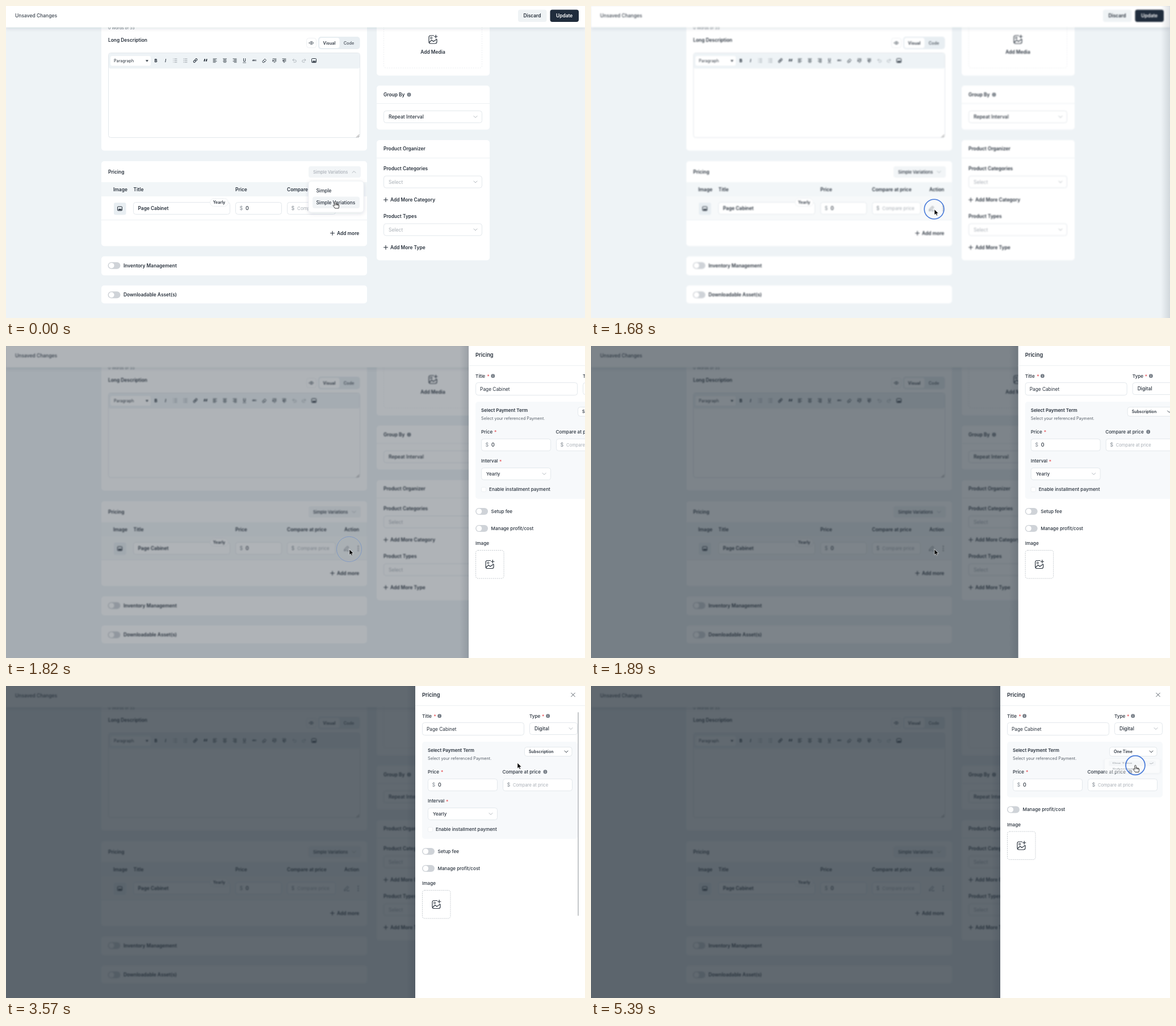
Animation, 1020 px wide and 549 px high, one loop 5.46 s. Source, as an HTML page:

```html
<!DOCTYPE html>
<html lang="en">
<head>
<meta charset="utf-8">
<title>Pricing editor</title>
<style>
html, body { margin: 0; width: 100%; height: 100%; overflow: hidden; background: #eef3f6; }
svg { display: block; width: 100%; height: 100%; font-family: Inter, "Open Sans", sans-serif; }
text { white-space: pre; }
</style>
</head>
<body>
<svg id="stage" viewBox="0 0 1020 549"></svg>
<script>
const INK = '#28313c', GREY = '#a9afb6', LINE = '#e3e8ec', TINT = '#eef3f6', ITEM = 'Page Cabinet';

// Drawing helpers: each returns SVG markup.
const text = (x, mid, s, size = 8.4, weight = 600, fill = INK, anchor = 'start') =>
  `<text x="${x}" y="${mid + size * .36}" font-size="${size}" font-weight="${weight}" fill="${fill}" text-anchor="${anchor}">${s}</text>`;
const rect = (x, y, w, h, r = 0, fill = '#fff', stroke = 'none', extra = '') =>
  `<rect x="${x}" y="${y}" width="${w}" height="${h}" rx="${r}" fill="${fill}" stroke="${stroke}" ${extra}/>`;
const path = (d, stroke = INK, w = 1, fill = 'none', extra = '') =>
  `<path d="${d}" stroke="${stroke}" stroke-width="${w}" fill="${fill}" stroke-linecap="round" stroke-linejoin="round" ${extra}/>`;
const group = (body, attrs = '') => `<g ${attrs}>${body}</g>`;
const at = (x, y, body, k = 1) => group(body, `transform="translate(${x} ${y}) scale(${k})"`);

const box = (x, y, w, h) => rect(x + .5, y + .5, w - 1, h - 1, 4, '#fff', LINE);
const card = (x, y, w, h) => rect(x, y, w, h, 5);
const rule = (x, y, w) => rect(x, y, w, 1, 0, '#edf1f3');
const chevron = (x, y, color = GREY, dir = 1) => path(`M${x - 3} ${y - 1.5 * dir}l3 ${3 * dir} 3 ${-3 * dir}`, color, .9);
const select = (x, y, w, label, color = INK, size = 8.6) =>
  box(x, y, w, 22) + text(x + 9, y + 11, label, size, color === INK ? 500 : 400, color) + chevron(x + w - 12, y + 11);
const money = (x, y, w, value, hint, size) => box(x, y, w, 22) + text(x + 7.5, y + 11, '$', 9, 400, '#868e96') +
  (value ? text(x + 18, y + 11, value, 9, 500) : text(x + 18, y + 11, hint, size, 400, GREY));
const plus = (x, y, label) => path(`M${x} ${y}h7m-3.5-3.5v7`, INK, 1.1) + text(x + 11.5, y, label);
const toggle = (x, y) => rect(x, y - 6, 22, 12, 6, '#cfd3d8') + `<circle cx="${x + 6.3}" cy="${y}" r="4.8" fill="#fff"/>`;
const info = (x, y) => `<circle cx="${x}" cy="${y}" r="3.4" fill="#737b84"/>` + path(`M${x} ${y - .2}v1.7m0-3.3v.1`, '#fff', .8);
const star = (x, y) => text(x, y + 1, '*', 8.4, 500, '#e5484d');
const media = (x, y, color = INK) => at(x, y,
  path('M1.5-7H-4Q-7-7-7-4V4Q-7 7-4 7H4Q7 7 7 4V-.5M-6.5 5L-2 1 1 3.5 6.5-.5M5.2-8v5.4M2.5-5.3h5.4', color, 1.15) +
  `<circle cx="-2.8" cy="-2.8" r="1.5" fill="none" stroke="${color}"/>`);
const picture = (x, y, color = INK) => at(x, y, rect(-4, -3.5, 8, 7, 1, 'none', color) +
  path('M-3 2.6L-1 0 .5 1.3 2 0 3.2 2.6z', color, .4, color));

function toolbar() {
  const bars = (x, xs) => xs.map(([a, b], i) => path(`M${x + a} ${93 + i * 2}H${x + b}`, INK, .9)).join('');
  const list = (x, dot) => [93, 96, 99].map(y => path(`M${x - 1} ${y}h4M${x - 3.2} ${y}h${dot}`, '#858c94', .8)).join('');
  const turn = (x, k) => group(path('M-1-3L-3-1 -1 1M-3-1H1Q3.4-1 3.4 1T1 3H-1', GREY, .9), `transform="translate(${x} 96) scale(${k} 1)"`);
  const shift = (x, k) => bars(x, [[-3, 3], [0, 3], [0, 3], [-1, 1]]) + path(`M${x - 2 - k} 95l${2 * k} 1.3 ${-2 * k} 1.3z`, INK, .5, INK);
  return text(264, 96, 'B', 7.6, 800, INK, 'middle') +
    `<g font-style="italic">${text(281, 96, 'I', 7.6, 600, INK, 'middle')}</g>` +
    list(298, .1) + list(316, .6) +
    group(rect(-4, -1.5, 4.2, 3, 1.5, 'none', INK) + rect(-.2, -1.5, 4.2, 3, 1.5, 'none', INK), 'transform="translate(333.5 96) rotate(-45)"') +
    text(351, 99, '“', 14, 800, INK, 'middle') +
    bars(368, [[-3, 3], [-3, 1], [-3, 3], [-3, 1]]) + bars(385.5, [[-3, 3], [-2, 2], [-3, 3], [-2, 2]]) +
    bars(403, [[-3, 3], [-1, 3], [-3, 3], [-1, 3]]) +
    text(420, 95.5, 'U', 7, 600, INK, 'middle') + path('M417.5 99.8h5', INK, .7) +
    text(437.5, 96, 'ABC', 3.4, 600, INK, 'middle') + path('M434 96h7', INK, .5) +
    path('M452 97l4-4 2.5 2.5-4 4h-1.5zM453.5 95.7l2.5 2.6', INK, .9) +
    shift(473, 1) + shift(490, -1) + turn(508, 1) + turn(525, -1) + picture(542.5, 96);
}

function menu(id, x, y, items, hover, size) {
  return group(rect(x, y, 97, 55, 5, '#fff', '#eceff2', 'filter="url(#soft)"') +
    rect(x + 7, y + 7 + hover * 20.5, 83, 20.5, 4, '#f1f4f6') +
    items.map((s, i) => text(x + 13.5, y + 17.3 + i * 20.5, s, size, 500)).join(''), `id="${id}"`);
}

const page = () => rect(0, 0, 1020, 549, 0, TINT) +
  // long description
  card(168, 20, 468, 234.5) + text(180, 38, '0 Words of 55', 7, 400, '#6d757d') + text(180, 60, 'Long Description') +
  rect(529.5, 56.5, 17, 17, 4, '#fff', '#eef1f3') + path('M534 65Q538 59.8 542 65Q538 70.2 534 65z', '#59616a', .9) +
  '<circle cx="538" cy="65" r="1.3" fill="none" stroke="#59616a" stroke-width=".9"/>' +
  rect(550, 54, 73.5, 22, 5, '#e8eef2') + rect(552, 56, 35.5, 18, 4) + text(569.5, 65, 'Visual', 7.3, 600, INK, 'middle') +
  text(604, 65, 'Code', 7.3, 600, '#59616a', 'middle') +
  rect(180.5, 82.5, 443, 149, 4, '#fff', LINE) + rect(181, 83, 442, 27, 3, TINT) +
  rect(184, 88, 71, 17, 3) + text(190, 96.3, 'Paragraph', 7.2, 400) + path('M246.5 95.3h4l-2 2.6z', INK, .4, INK) + toolbar() +
  path('M617.5 231l4.5-4.5M620 231l2-2', '#555', .7) +
  // side cards
  card(653, 20, 199, 102.5) + rect(665.5, 20, 173, 89, 4, 'none', '#eceff1', 'stroke-dasharray="2 2"') +
  media(752, 59) + text(752, 81, 'Add Media', 8.4, 600, INK, 'middle') +
  card(653, 140, 199, 77.5) + text(665, 156, 'Group By') + info(710, 156) + rule(653, 171, 199) + select(665, 184, 174, 'Repeat Interval') +
  card(653, 236, 199, 211.5) + text(665, 251, 'Product Organizer') + rule(653, 267, 199) +
  text(665, 285.5, 'Product Categories') + select(665, 298.5, 174, 'Select', GREY) + plus(665.5, 341, 'Add More Category') +
  text(665, 369.5, 'Product Types') + select(665, 382.5, 174, 'Select', GREY) + plus(665.5, 424.7, 'Add More Type') +
  // pricing table
  card(168, 273, 468, 149.5) + text(180, 292, 'Pricing') + rect(168, 310, 468, 25, 0, '#f2f6f8') +
  rect(168, 335, 468, 41, 0, '#f7f9fa', 'none', 'id="rowHover"') + rule(168, 376, 468) +
  rect(533, 282, 92, 20, 4, '#f2f5f7') +
  group(text(541, 292, 'Simple Variations', 7.4, 500, GREY) + chevron(613, 292, GREY, -1), 'id="opened"') +
  group(text(541, 292, 'Simple Variations', 7.4, 500) + chevron(613, 292), 'id="closed"') +
  [[189, 'Image'], [224.5, 'Title'], [404, 'Price'], [495, 'Compare at price'], [596, 'Action']].map(([x, s]) => text(x, 322.5, s)).join('') +
  rect(190, 346, 21.5, 21.5, 3, '#e8eef2') + picture(200.5, 356.5) +
  box(224, 345, 171, 22) + text(232.5, 356, ITEM) + rect(359.5, 338.5, 32, 14, 7, '#fff', '#eef1f3') + text(375.5, 345.7, 'Yearly', 7, 600, INK, 'middle') +
  money(404, 345, 82, '0') + money(495, 345, 86, '', 'Compare price', 8.1) +
  path('M596 360l.6-2.6 5-5 2 2-5 5zM600.5 360.3h4', '#59616a', .9) + [352.5, 356.3, 360].map(y => `<circle cx="620.5" cy="${y}" r=".9" fill="#59616a"/>`).join('') +
  plus(571.5, 399.7, 'Add more') +
  card(168, 440.5, 468, 33.5) + toggle(179.5, 456.7) + text(207, 456.7, 'Inventory Management') +
  card(168, 491.7, 468, 31.5) + toggle(179.5, 508.3) + text(207, 508.3, 'Downloadable Asset(s)') +
  menu('typeMenu', 533, 308, ['Simple', 'Simple Variations'], 1, 8.3) +
  // header
  rect(0, 0, 1020, 37.5, 0, '#fff', 'none', 'filter="url(#soft)"') + text(16, 17, 'Unsaved Changes', 8.5, 500, '#3d4650') +
  rect(902, 6.5, 50.5, 21.5, 4, '#eff3f5') + text(927, 17, 'Discard', 8.4, 600, INK, 'middle') +
  rect(958.5, 6.5, 50.5, 21.5, 4, '#202c3c') + text(983.7, 17, 'Update', 8.4, 600, '#fff', 'middle');

// mode: 0 empty, 1 subscription, 2 one time
function panel(mode) {
  const once = mode === 2, label = (x, y, s) => text(x, y, s, 8.2, 500);
  const imageY = [214.5, 347.5, 244][mode];
  let out = rect(733, 98, 274, mode === 1 ? 171 : 98, 5, '#f7f9fb') +
    box(733, 64, 180, 23) + text(mode ? 741 : 737.5, 75.7, mode ? ITEM : 'Title', 8.3, 400, mode ? INK : GREY) +
    text(743, 113.5, 'Select Payment Term', 8, 600) + text(743, 127, 'Select your referenced Payment.', 7.25, 400, '#59616a') +
    rect(913.5, 107.5, 83.5, 16, 4, '#fff', LINE, 'class="term"') + text(921, 115.4, once ? 'One Time' : 'Subscription', 7.1, 600) + chevron(987, 115.5, INK) +
    label(743, 151, 'Price') + star(766, 151) + money(743, 163, 123, mode ? '0' : '', 'Price', 8) +
    label(874.5, 151, 'Compare at price') + info(950, 151) + money(875, 163, 123, '', 'Compare at price', 7.6);
  if (mode === 1) out += label(743, 202.5, 'Interval') + star(775, 202.5) + select(743, 214, 123, 'Yearly', INK, 8.1) +
    rect(743.5, 248.5, 8, 8, 2, '#fff', '#eceff2') + label(757, 252.5, 'Enable installment payment') +
    toggle(733, 291) + label(760.5, 291, 'Setup fee');
  if (mode) { const y = once ? 217.5 : 321; out += toggle(733, y) + label(760.5, y, 'Manage profit/cost'); }
  out += label(733, imageY, 'Image') + rect(733.5, imageY + 12, 49.5, 49.5, 4, '#fff', '#c3c8cd', 'stroke-dasharray="2 1.5"') + media(758, imageY + 37);
  return group(out, `id="panel${mode}"`);
}

const drawer = () => rect(705, 0, 16, 549, 0, 'url(#edge)') + rect(721, 0, 299, 549) +
  text(733, 15.5, 'Pricing', 9.3, 600) + path('M995.7 12.2l6.6 6.6m0-6.6l-6.6 6.6', '#59616a', 1) + rule(721, 34, 299) +
  text(733, 52.7, 'Title', 8.2, 500) + star(753.5, 52.7) + info(763.7, 52.7) +
  text(922, 52.7, 'Type', 8.2, 500) + star(944, 52.7) + info(954.7, 52.7) + select(922, 64, 85, 'Digital') +
  [0, 1, 2].map(panel).join('') + rect(1007, 46, 2, 358.5, 1, '#c4c7ca', 'none', 'id="bar"');

stage.innerHTML = `<defs>
  <filter id="soft" x="-20%" y="-20%" width="140%" height="160%"><feDropShadow dx="0" dy="2" stdDeviation="3" flood-color="#1f2d3d" flood-opacity=".13"/></filter>
  <linearGradient id="edge"><stop stop-color="#1f2d3d" stop-opacity="0"/><stop offset="1" stop-color="#1f2d3d" stop-opacity=".14"/></linearGradient></defs>` +
  group(page(), 'id="page"') + rect(0, 0, 1020, 549, 0, '#25303a', 'none', 'id="shade"') +
  group(drawer(), 'id="drawer"') +
  menu('termMenu', 905, 128, ['One Time', 'Subscription'], 0, 7.6).replace('</g>',
    path('M984.5 145.5l2 2 4-4', INK, 1, 'none', 'id="tickOnce"') + path('M984.5 166l2 2 4-4', INK, 1, 'none', 'id="tickSub"') + '</g>') +
  '<circle id="ring" stroke="#3f74d8" fill="#3f74d8"/>' +
  group(path('M0 0V9.6L2.3 7.6 3.9 10.9 5.5 10.2 4 7H7z', '#fff', .6, '#000', 'id="arrow"') +
    path('M-1.3 1.2C-1.3-.6 1.2-.6 1.2 1.2V4.3L5.2 5.2Q7 5.8 6.7 7.6L6 12H-.3L-3.5 7.8C-4.4 6.4-2.8 5.6-1.3 7.1zM1.2 4.3V6.5M3.4 5v1.8M5.2 5.4V7', '#222', .9, '#fff', 'id="hand"'), 'id="cursor"');

const $ = id => document.getElementById(id);
const clamp = u => Math.max(0, Math.min(1, u));
const span = (t, a, b) => clamp((t - a) / (b - a));
const smooth = u => u * u * (3 - 2 * u);
const show = (id, on) => $(id).setAttribute('display', on ? 'inline' : 'none');
const set = (id, attrs) => { for (const k in attrs) $(id).setAttribute(k, attrs[k]); };

const route = [[140, 580, 344], [630, 594, 353], [770, 605, 358], [2060, 605, 358], [2590, 803, 153], [2660, 805, 151],
  [2940, 817, 146], [3250, 817, 146], [3780, 945, 130], [4200, 963, 116.5], [4520, 963, 116.5], [4970, 959, 139.5]];
const clicks = [[1540, 604.5, 357.5], [4480, 962.5, 116], [5260, 959, 139.5]];

function pointer(t) {
  const i = route.findIndex(k => k[0] > t);
  if (i < 1) return (i ? route[route.length - 1] : route[0]).slice(1);
  const [a, b] = [route[i - 1], route[i]], u = smooth(span(t, a[0], b[0]));
  return [a[1] + (b[1] - a[1]) * u, a[2] + (b[2] - a[2]) * u];
}

function fold(id, y, size, opacity) {
  set(id, { transform: `translate(0 ${y}) scale(1 ${size}) translate(0 ${-y})`, opacity });
}

function draw(t) {
  const closing = span(t, 140, 290);
  fold('typeMenu', 308, 1 - .6 * closing, 1 - closing);
  show('opened', t < 210);
  show('closed', t >= 210);
  show('rowHover', t >= 560);
  $('page').style.filter = t > 1600 ? 'blur(.8px)' : 'none';
  set('shade', { opacity: .72 * span(t, 1710, 1930) });

  const slide = 299 * (1 - span(t, 1694, 1994)) ** 2.1;
  set('drawer', { transform: `translate(${slide} 0)` });
  show('drawer', t > 1620);
  const mode = t < 1800 ? 0 : t < 5320 ? 1 : 2;
  [0, 1, 2].forEach(m => show('panel' + m, m === mode));
  show('bar', t >= 2100 && t < 4760);
  const hover = t >= 3960 && t < 4720;
  document.querySelectorAll('.term').forEach(e => e.setAttribute('fill', hover ? '#eff1f3' : '#fff'));

  const grow = span(t, 4540, 4700), shrink = span(t, 5320, 5445);
  fold('termMenu', 128, (.5 + .5 * smooth(grow)) * (1 - .95 * shrink), grow * (1 - shrink));
  show('tickOnce', mode === 2);
  show('tickSub', mode !== 2);

  const click = clicks.find(c => t >= c[0] && t < c[0] + 330);
  show('ring', click);
  if (click) {
    const age = t - click[0];
    set('ring', { cx: click[1], cy: click[2], r: 12.5 + age * .034, 'stroke-width': Math.max(.9, 3 - age * .0095),
      'fill-opacity': .12 * (1 - span(age, 0, 130)), opacity: (.6 + .35 * span(age, 0, 130)) * (1 - span(age, 220, 330)) });
  }

  const [x, y] = pointer(t), hand = t < 1050 || t >= 3960;
  set('cursor', { transform: `translate(${x} ${y})` });
  show('hand', hand);
  show('arrow', !hand);
}

const start = performance.now();
function frame() {
  draw((performance.now() - start) % 5460);
  requestAnimationFrame(frame);
}
frame();
</script>
</body>
</html>
```
